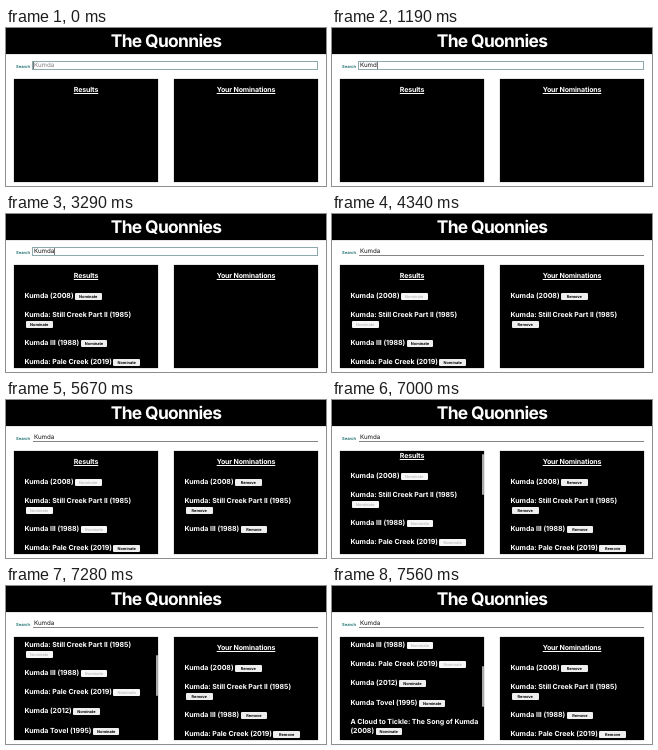
An HTML page that plays this animation: 320x158 px, repeating every 8 s.

```html
<!DOCTYPE html>
<html lang="en">
<head>
<meta charset="utf-8">
<title>Nominations</title>
<style>
  html, body { margin: 0; width: 100%; height: 100%; overflow: hidden; background: #fff; }
  body { position: relative; font-family: Inter, "Liberation Sans", sans-serif; text-rendering: geometricPrecision; }
  div { position: absolute; box-sizing: border-box; white-space: pre; }
  #head, .panel { background: #000; color: #fff; box-shadow: 0 0 1px rgba(0, 0, 0, .6); }
  #head { width: 320px; height: 26px; text-align: center;
    font-size: 17.4px; font-weight: 700; line-height: 27px; letter-spacing: -.65px; }
  #label { left: 10px; top: 34px; font-size: 4.1px; font-weight: 700; line-height: 9px; color: #2b7a78; }
  #field { left: 26px; top: 33px; width: 286px; height: 9px; }
  #field.focus { border: 1px solid #8caaae; }
  #field:not(.focus) { left: 27px; width: 285px; border-bottom: 1px solid #858585; }
  #query { left: 28px; top: 33px; font-size: 6.2px; line-height: 9px; color: #111; }
  #query.empty { color: #808080; }
  #caret { width: 1px; height: 7px; top: 34px; background: #777; }
  .panel { top: 51px; width: 144px; height: 103px; overflow: hidden;
    font-size: 7px; font-weight: 700; line-height: 9.4px; letter-spacing: -.03px; }
  .list { width: 144px; height: 180px; }
  h2 { margin: 0; padding-top: 6.3px; font: inherit; letter-spacing: -.14px; text-align: center;
    text-decoration: underline; text-decoration-thickness: 1px; text-underline-offset: 1px; }
  .row { left: 10.5px; }
  .row span { display: inline-block; position: relative; top: .4px; width: 26.5px; height: 7px; margin-left: 1.5px;
    vertical-align: middle; border-radius: 1px; background: #efefef; color: #000; text-align: center;
    font-size: 3.9px; font-weight: 700; line-height: 7px; letter-spacing: 0; }
  .row .pressed { background: #c4c4c4; }
  .row .done { background: #f7f7f7; color: #c2c2c2; }
  #thumb { left: 142px; width: 2px; height: 41px; border-radius: 1px; background: #a8a8a8; }
</style>
</head>
<body>
<div id="head">The Quonnies</div>
<div id="label">Search</div>
<div id="field"></div>
<div id="query"></div>
<div id="caret"></div>
<div class="panel" style="left:8px"><div class="list" id="results"><h2>Results</h2></div><div id="thumb"></div></div>
<div class="panel" style="left:168px"><div class="list" id="picks"><h2>Your Nominations</h2></div></div>
<script>
const LOOP = 8000, BLUR = 3430, LOADED = 1260, SCROLL = 7000;
const WORD = "Kumda";
const keyTimes = [630, 840, 980, 1120, LOADED];
const caretFlips = [350, 630, 1750, 2240, 2800, 3290];

// Title, row centre, time of press, time of nomination
const films = [
  ["Kumda (2008)", 81.3, 3430, 3570],
  ["Kumda: Still Creek Part II (1985)\n", 100.4, 4200, 4340],
  ["Kumda III (1988)", 128.5, 5530, 5670],
  ["Kumda: Pale Creek (2019)", 147.8, 6300, 6510],
  ["Kumda (2012)", 167.1],
  ["Kumda Tovel (1995)", 186.4],
  ["A Cloud to Tickle: The Song of Kumda\n(2008)", 205.7]
];

const $ = id => document.getElementById(id);
const show = (el, on) => { el.style.visibility = on ? "visible" : "hidden"; };

function addRow(list, title, y, action) {
  const row = document.createElement("div");
  const button = document.createElement("span");
  row.className = "row";
  row.style.top = y - 51 - 4.7 + "px";
  button.textContent = action;
  row.append(title, button);
  list.append(row);
  return { row, button };
}

const rows = films.map(([title, y, press, done]) => ({
  press, done,
  result: addRow($("results"), title, y, "Nominate"),
  pick: done && addRow($("picks"), title, y, "Remove")
}));

function draw(t) {
  const typed = WORD.slice(0, keyTimes.filter(k => t >= k).length);
  const focused = t < BLUR;
  $("query").textContent = typed || WORD;
  $("query").className = typed ? "" : "empty";
  $("field").className = focused ? "focus" : "";
  const flips = caretFlips.filter(f => t >= f).length;
  show($("caret"), focused && flips % 2 === 0);
  $("caret").style.left = Math.round(typed ? 28 + $("query").getBoundingClientRect().width : 27) + "px";

  for (const { press, done, result, pick } of rows) {
    show(result.row, t >= LOADED);
    result.button.className = t >= done ? "done" : t >= press ? "pressed" : "";
    if (pick) show(pick.row, t >= done);
  }

  const scrolling = t >= SCROLL;
  const n = Math.min(8, Math.floor((t - SCROLL) / 70));
  const offset = scrolling ? Math.round(6 + 10 * n - n * n / 4) : 0;
  $("results").style.top = -offset + "px";
  $("thumb").style.top = 1 + .4 * offset + "px";
  show($("thumb"), scrolling);
}

const start = performance.now();
function tick() {
  draw((performance.now() - start) % LOOP);
  requestAnimationFrame(tick);
}
tick();
</script>
</body>
</html>
```
